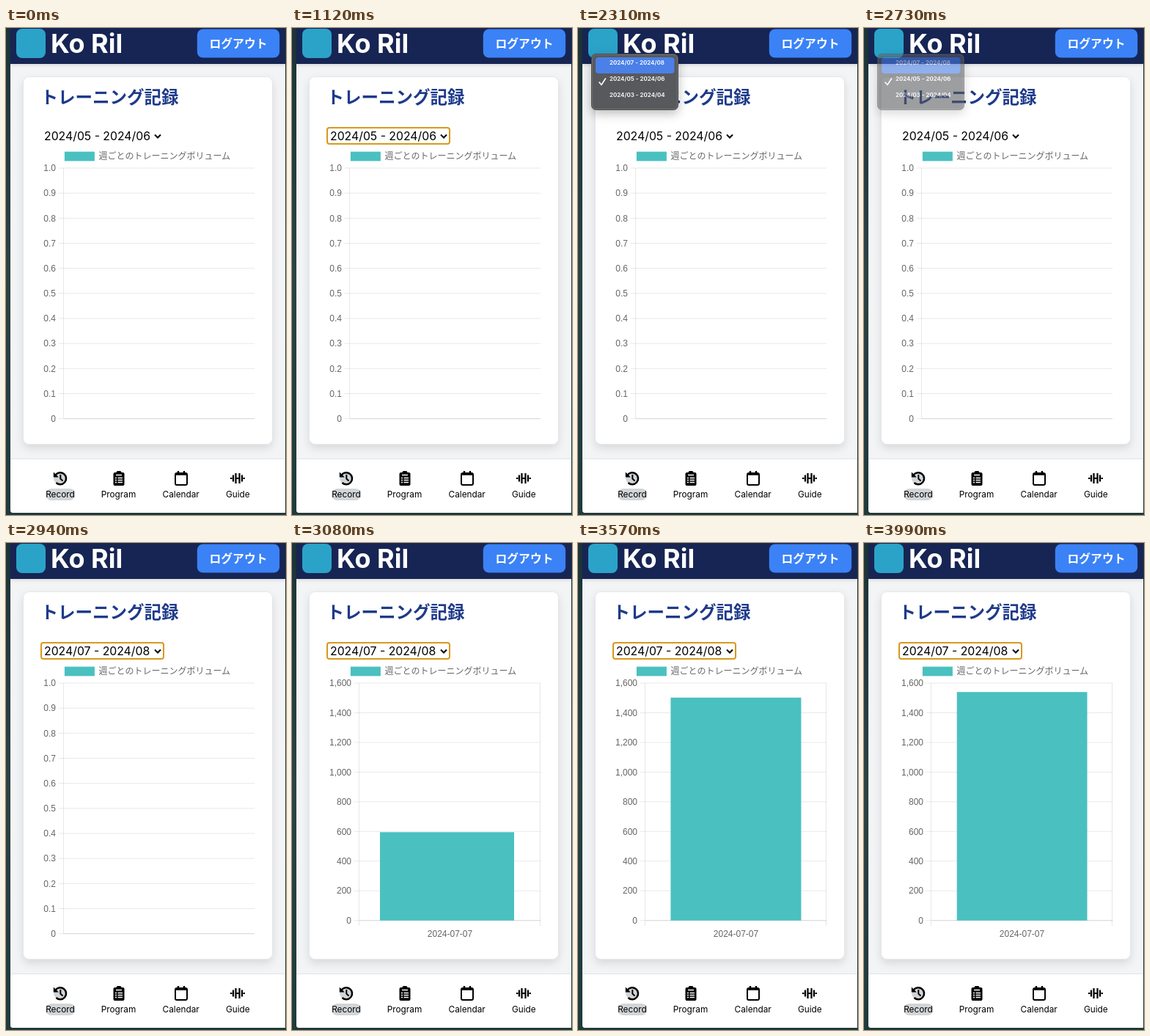
An HTML page that plays this animation: 382 px wide and 664 px high, repeating every 5.04 s.

```html
<!DOCTYPE html>
<html lang="ja">
<head>
<meta charset="utf-8">
<title>トレーニング記録</title>
<style>
  html, body { margin: 0; width: 100%; height: 100%; overflow: hidden; background: #25393b; }
  svg { display: block; width: 382px; height: 664px; }
  text { font-family: Inter, "Noto Sans CJK JP", sans-serif; white-space: pre; }
  .header { filter: drop-shadow(0 2px 2px rgba(0, 0, 0, .1)); }
  .brand { font-size: 36px; font-weight: 700; fill: #fff; }
  .logout { font-size: 15.8px; font-weight: 700; fill: #fff; text-anchor: middle; }
  .title { font-size: 23.5px; font-weight: 700; fill: #1e3a8a; }
  .select { font-size: 15.8px; }
  .chart text { font: 12px "Liberation Sans", Arial, "Noto Sans CJK JP", sans-serif; fill: #666; }
  .chart path { stroke: #000; stroke-opacity: .09; fill: none; }
  .end { text-anchor: end; }
  .mid { text-anchor: middle; }
  .nav text { font-size: 11.8px; text-anchor: middle; }
  .line { fill: none; stroke: #000; stroke-width: 2; }
  .menu text { font-size: 8px; font-weight: 600; fill: #fff; }
  .menu .panel { filter: drop-shadow(0 5px 7px rgba(0, 0, 0, .26)); }
  .card { filter: drop-shadow(0 5px 6px rgba(0, 0, 0, .11)); }
</style>
</head>
<body>
<svg viewBox="0 0 382 664">
  <defs>
    <linearGradient id="edge" x2="0" y2="1">
      <stop stop-color="#1d3438"/><stop offset=".5" stop-color="#2c4243"/><stop offset="1" stop-color="#203a3c"/>
    </linearGradient>
  </defs>
  <rect width="382" height="664" fill="url(#edge)"/>
  <path d="M6 0H381V661H10Q6 661 6 657Z" fill="#f3f4f6"/>

  <rect class="header" x="6" width="375" height="49" fill="#172554"/>
  <rect x="14" y="1" width="40" height="40" rx="8" fill="#2ba3c9"/>
  <text class="brand" x="61" y="34">Ko Ril</text>
  <rect x="260.8" y="1.500" width="112.400" height="39" rx="8" fill="#3b82f6"/>
  <text class="logout" x="317" y="26.800">ログアウト</text>

  <rect class="card" x="23.500" y="66.500" width="340" height="501" rx="8" fill="#fff" stroke="#e5e7eb"/>
  <text class="title" x="47.500" y="103">トレーニング記録</text>

  <rect id="ring" x="48" y="136" width="167" height="22" rx="3" fill="none" stroke="#d9981c" stroke-width="2"/>
  <text class="select" id="range" x="52" y="153"></text>
  <path class="line" d="M203 145.500L207 149.500L211 145.500"/>

  <g class="chart">
    <rect x="79.900" y="168.600" width="41" height="12.800" fill="#4bc0c0"/>
    <text x="126.500" y="179">週ごとのトレーニングボリューム</text>
    <g id="empty"></g>
    <g id="filled">
      <path d="M338.500 191V522M91.500 515V522"/>
      <text class="mid" x="215.500" y="537">2024-07-07</text>
    </g>
    <rect id="bar" fill="#4bc0c0"/>
  </g>

  <g class="nav">
    <path d="M6 587H381V661H10Q6 661 6 657Z" fill="#fff"/>
    <path d="M6 587.500H381" stroke="#e2e4e8"/>
    <rect x="54" y="628" width="40.500" height="16" rx="8" fill="#d1d5d8"/>
    <circle cx="74" cy="614" r="9" fill="#d1d5d8"/>
    <path class="line" d="M67.600 609.500A8 8 0 1 1 68.500 620" style="stroke-width:2.5"/>
    <path d="M64.800 605.500V612.500H71.800Z"/>
    <path class="line" d="M74.300 609V614.500L77.500 617.500"/>
    <rect x="146.500" y="606" width="15" height="18" rx="2"/>
    <rect x="150.500" y="604" width="7" height="5" rx="2"/>
    <path d="M150 609.500H158M149 613.500H151M152.500 613.500H159M149 616.500H151M152.500 616.500H159M149 619.500H151M152.500 619.500H159" stroke="#fff" stroke-width="1.3"/>
    <rect class="line" x="231" y="607" width="16" height="16" rx="2"/>
    <path class="line" d="M231 608.500H247M235 604V608M243 604V608" style="stroke-width:2.5"/>
    <path class="line" d="M306 614H308.500M310 609.500V618.500M313.500 607V621M313.500 614H318.500M318.500 607V621M322 609.500V618.500M323.500 614H326" style="stroke-width:2.2"/>
    <text x="74" y="640">Record</text>
    <text x="153.500" y="640">Program</text>
    <text x="238.700" y="640">Calendar</text>
    <text x="316.300" y="640">Guide</text>
  </g>

  <g class="menu" id="menu">
    <rect class="panel" x="18.500" y="35.500" width="118" height="76" rx="6" fill="#58595c" stroke="#47484b"/>
    <rect x="19.500" y="36.500" width="116" height="74" rx="5" fill="none" stroke="#fff" stroke-opacity=".15"/>
    <rect id="hover" x="24" width="107.500" height="22" rx="4" fill="#4a80e8"/>
    <text x="43" y="50">2024/07 - 2024/08</text>
    <text x="43" y="72">2024/05 - 2024/06</text>
    <text x="43" y="94">2024/03 - 2024/04</text>
    <path d="M29 74L32 77.500L37.500 69" fill="none" stroke="#fff" stroke-width="1.6" stroke-linecap="round"/>
  </g>
</svg>
<script>
  const LOOP = 5040, TICK = 70;
  const $ = id => document.getElementById(id);
  const show = (id, on) => $(id).setAttribute('visibility', on ? 'visible' : 'hidden');
  const set = (id, attrs) => {
    for (const key in attrs) $(id).setAttribute(key, attrs[key]);
  };

  // Horizontal grid with labels, from the highest value down to zero
  function drawAxis(id, left, bottom, count, label) {
    const top = 191, step = (bottom - top) / count;
    let out = `<path d="M${left - .5} ${top}V${bottom}"/>`;
    for (let i = 0; i <= count; i++) {
      const y = top + i * step;
      out += `<path d="M${left - 7.5} ${y}H339"/>` +
        `<text class="end" x="${left - 11}" y="${y + 4.2}">${label(count - i)}</text>`;
    }
    out += `<path d="M${left} ${bottom}H339"/>`;
    $(id).insertAdjacentHTML('afterbegin', out);
  }
  drawAxis('empty', 79, 532.7, 10, n => n ? (n / 10).toFixed(1) : '0');
  drawAxis('filled', 92, 514.7, 8, n => (n * 200).toLocaleString('en-US'));

  // Value of the last [time, value] pair that has been reached
  const at = (steps, t) => steps.reduce((v, [from, value]) => t >= from ? value : v, null);

  const ring = [[0, 0], [1120, 1], [1750, 0], [2940, 1]];
  const menu = [[0, 0], [1820, 1], [2730, .58], [2800, .22], [2870, 0]];
  const hover = [[0, -1], [2100, 2], [2170, 1], [2310, 0], [2590, -1], [2660, 0]];
  const range = [[0, '2024/05 - 2024/06'], [2940, '2024/07 - 2024/08']];

  function render(now) {
    const t = Math.floor(now % LOOP / TICK) * TICK;
    show('ring', at(ring, t));
    $('range').textContent = at(range, t);

    const alpha = at(menu, t), row = at(hover, t);
    show('menu', alpha);
    set('menu', { opacity: alpha });
    set('hover', { y: 40 + 22 * row, opacity: row < 0 ? 0 : 1 });

    const loaded = t >= 3010;
    show('empty', !loaded);
    show('filled', loaded);
    show('bar', loaded);

    // One second of ease-out quart
    const p = Math.min(1, Math.max(0, (t - 2965) / 1000));
    const rest = (1 - p) ** 4;
    const x = 126.7 - 10.9 * rest, height = 311.5 * (1 - rest);
    set('bar', { x, y: 514.7 - height, width: 304.5 - 2.4 * rest - x, height });
  }

  function frame() {
    render(performance.now());
    requestAnimationFrame(frame);
  }
  frame();
</script>
</body>
</html>
```
